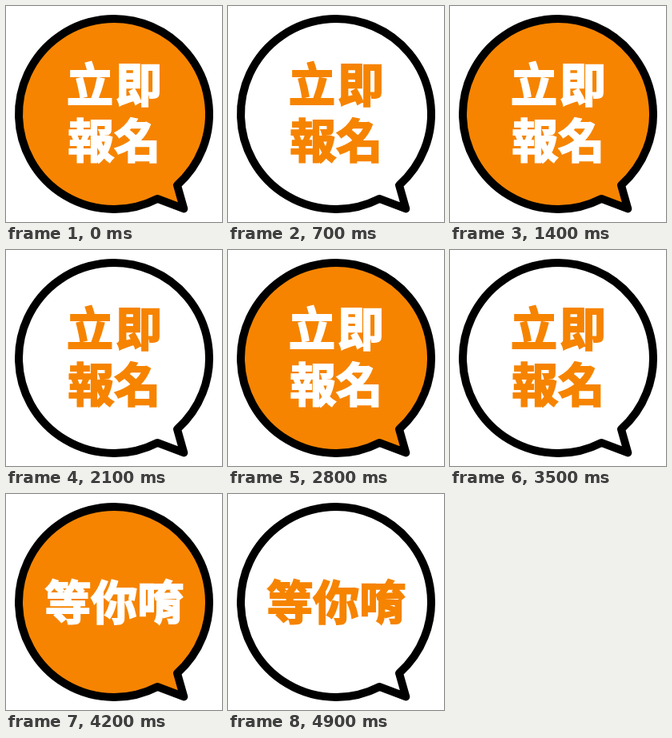
An HTML page for the animation above (5.6 s loop, 270 by 270 pixels).

```html
<!DOCTYPE html>
<html lang="zh-Hant-TW">
<head>
<meta charset="utf-8">
<style>
html, body { margin: 0; height: 100%; overflow: hidden; background: #fff; }
svg { display: block; width: 100vw; height: 100vh; }
text {
  font: 700 58px "Noto Sans CJK TC", "Noto Sans CJK", sans-serif;
  text-anchor: middle;
  stroke: currentColor;
  stroke-width: 2;
  fill: currentColor;
}
</style>
</head>
<body>
<svg viewBox="0 0 270 270">
  <path id="bubble" d="M214 223.990A119 119 0 1 0 189.200 240.940L222.300 253.400Z" stroke="#000" stroke-width="10" stroke-linejoin="round"/>
  <g id="signup"><text x="137" y="119.500" letter-spacing="3">立即</text><text x="135.300" y="190.300">報名</text></g>
  <g id="waiting"><text x="135.300" y="157">等你唷</text></g>
</svg>
<script>
const STEP = 700, STEPS = 8, WAITING_FROM = 6;
const ORANGE = '#f68400', WHITE = '#fff';
const [bubble, signup, waiting] = ['bubble', 'signup', 'waiting'].map(id => document.getElementById(id));
const start = performance.now();

function draw(now) {
  const step = Math.floor(Math.max(0, now - start) / STEP) % STEPS;
  const filled = step % 2 === 0;
  const late = step >= WAITING_FROM;
  bubble.setAttribute('fill', filled ? ORANGE : WHITE);
  for (const group of [signup, waiting]) {
    group.setAttribute('color', filled ? WHITE : ORANGE);
    group.setAttribute('display', (group === waiting) === late ? 'inline' : 'none');
  }
  requestAnimationFrame(draw);
}
draw(start);
</script>
</body>
</html>
```
